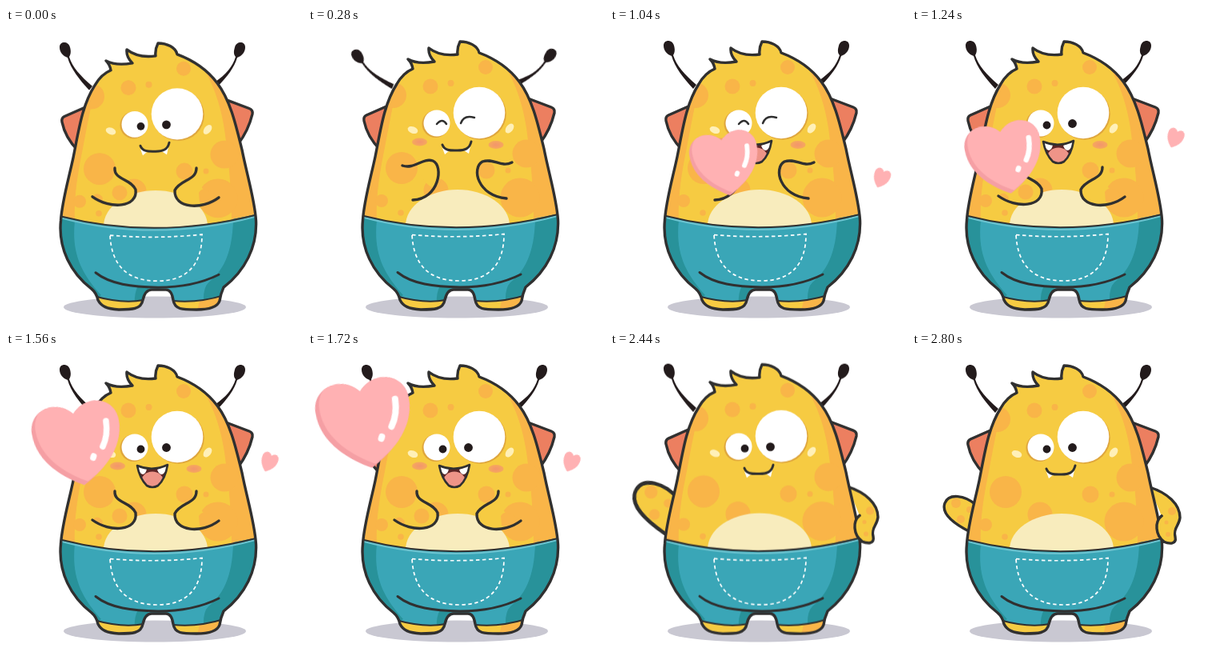
An HTML page that plays this animation: 370x370 px, repeating every 3160 ms.

```html
<!DOCTYPE html>
<html lang="en">
<head>
<meta charset="utf-8">
<title>Little monster blows a kiss</title>
<style>
html, body { margin: 0; width: 100%; height: 100%; overflow: hidden; background: #fff; }
svg { display: block; width: 100vw; height: 100vh; }
.line { fill: none; stroke: #303030; stroke-width: 3.4; stroke-linecap: round; stroke-linejoin: round; }
.skin { fill: #f6cb42; }
.spot { fill: #f9b548; }
.teal { fill: #3aa6b7; }
.deep { fill: #28929a; }
.cream { fill: #f8ecbd; }
.glint { fill: #fff0b8; }

/* One loop is 3160 ms; poses change hard, the heart moves in 40 ms steps. */
.a { animation: 3160ms step-end infinite; }
.kiss { animation-name: kiss; }
.open { animation-name: open; }
.fold { animation-name: fold; }
.wave { animation-name: wave; }
.grin { animation-name: grin; }
.calm { animation-name: calm; }
.flush { animation-name: flush; }
#figure { animation-name: breathe; transform-origin: 187px 355px; }
#armL { animation-name: swing; transform-origin: 80px 214px; }
#antL { animation-name: spreadL; transform-origin: 105px 73px; }
#antR { animation-name: spreadR; transform-origin: 264px 68px; }
#tiny { animation-name: hop, grin; }
#fly { animation: fly 3160ms linear infinite, grin 3160ms step-end infinite; }

@keyframes kiss  { 0%, 39.241% { visibility: hidden } 8.861% { visibility: visible } }
@keyframes open  { 0%, 39.241% { visibility: visible } 8.861% { visibility: hidden } }
@keyframes fold  { 0%, 39.241% { visibility: visible } 8.861%, 56.962% { visibility: hidden } }
@keyframes wave  { 0% { visibility: hidden } 56.962%, 100% { visibility: visible } }
@keyframes grin  { 0%, 56.962%, 100% { visibility: hidden } 22.785% { visibility: visible } }
@keyframes calm  { 0%, 56.962%, 100% { visibility: visible } 22.785% { visibility: hidden } }
@keyframes flush { 0%, 56.962%, 100% { visibility: hidden } 8.861% { visibility: visible } }
@keyframes breathe {
  0% { transform: scaleY(.994) }
  8.861%, 65.823%, 88.608%, 100% { transform: none }
  56.962%, 77.215% { transform: scaleY(1.004) }
}
@keyframes swing {
  0%, 65.823%, 88.608%, 100% { transform: none }
  56.962%, 77.215% { transform: rotate(8deg) scale(1.35) }
}
@keyframes spreadL { 0%, 22.785%, 100% { transform: none } 8.861% { transform: rotate(-16deg) } }
@keyframes spreadR { 0%, 22.785%, 100% { transform: none } 8.861% { transform: rotate(16deg) } }
@keyframes hop {
  0% { transform: translate(339px, 188px) rotate(22deg) scale(.19, .235) }
  39.241%, 100% { transform: translate(328.5px, 138px) rotate(22deg) scale(.19, .235) }
}
@keyframes fly {
  0%, 22.785% { transform: translate(191px, 163px) rotate(-9deg) scale(.615); animation-timing-function: steps(8) }
  32.911% { transform: translate(144px, 169.5px) rotate(-9deg) scale(.775); animation-timing-function: steps(5) }
  39.241% { transform: translate(116px, 162.5px) rotate(-10deg) scale(.865); animation-timing-function: steps(8) }
  49.367% { transform: translate(90px, 115px) rotate(-9deg) scale(1); animation-timing-function: steps(6) }
  56.962%, 100% { transform: translate(62px, 77px) rotate(-9deg) scale(1.11) }
}
</style>
</head>
<body>
<svg viewBox="0 0 370 370">
  <defs>
    <path id="body" d="M68.500 240C70 216 78 189 84 161C91 126 95 95 111 70Q119 56 131 51Q130 44 125 39C134 44 147 44 158 42Q150 34 151 25Q165 36 187 33Q186 25 190 17C201 17 212 22 214 31Q246 43 264 67C280 88 287 118 295 151C301 182 311 214 312.500 240C314 273 299 303 272 324Q268 333 267 341C264 350 252 352 238 352C220 352 211 352 209 340Q207 327 200 327H182Q174 327 171 340C169 352 157 352 141 352C126 351 119 348 115 340Q113 331 107 326C81 306 65 275 68.500 240Z"/>
    <path id="heart" d="M0 52C-22 40-55 16-55-21C-55-52-18-60 0-38C18-60 55-52 55-21C55 16 22 40 0 52Z"/>
    <clipPath id="inBody"><use href="#body"/></clipPath>
    <clipPath id="inHeart"><use href="#heart"/></clipPath>
    <path id="foldL" d="M136 174C135 189 156 187 162 201C165 224 130 226 108 210"/>
    <path id="foldR" d="M238 174C238 190 218 188 211 202C210 225 245 227 266 211"/>
    <path id="raiseL" d="M118 172C133 177 143 162 156 166C170 172 164 214 131 215"/>
    <path id="outL" d="M80 191C66 179 46 176 41 189C36 203 53 215 73 225"/>
    <path id="outR" d="M297 169C319 176 335 190 335 207C334 217 326 221 329 231C331 241 322 240 314 237C305 229 301 212 312 205"/>
    <path id="smile" d="M164 142Q183 150 202 141Q199 159 190 167Q183 171 176 167Q167 158 164 142Z"/>
    <clipPath id="inSmile"><use href="#smile"/></clipPath>
    <radialGradient id="rouge">
      <stop offset=".2" stop-color="#f3986a"/>
      <stop offset="1" stop-color="#f6a95c"/>
    </radialGradient>
  </defs>

  <ellipse cx="186" cy="349" rx="114" ry="13.5" fill="#c9c8d2"/>

  <g id="figure" class="a">
    <g id="antL" class="a" fill="#231b1c">
      <path d="M67 22C67 14 78 14 80 22C82 29 80 32 79 34C83 47 93 58 108 71L104 76C92 63 81 49 77 35C71 33 67 28 67 22Z"/>
    </g>
    <g id="antR" class="a" fill="#231b1c">
      <path d="M299 22C299 14 288 14 286 22C284 29 285 32 287 34C283 47 275 56 261 66L265 71C277 58 285 48 289 35C295 33 299 28 299 22Z"/>
    </g>
    <g class="line" style="fill:#ec7f60">
      <path d="M98 98L73 109Q69 111 70 116Q74 136 90 152Z"/>
      <path d="M275 88L304 99Q309 101 308 106Q303 127 290 144Z"/>
    </g>

    <g class="a wave">
      <g id="armL" class="a">
        <use href="#outL" class="skin"/>
        <g class="spot"><circle cx="55" cy="189" r="6"/><circle cx="61" cy="209" r="5"/><circle cx="72" cy="197" r="4"/></g>
        <use href="#outL" class="line"/>
      </g>
      <use href="#outR" class="skin"/>
      <use href="#outR" class="line"/>
    </g>

    <use href="#body" class="skin"/>
    <g clip-path="url(#inBody)">
      <g class="spot">
        <path d="M245 45C266 80 273 115 276 150C280 180 282 215 282 244H325V45Z"/>
        <path d="M60 245V80H110C102 115 98 140 92 170C87 198 85 220 86 245Z"/>
        <circle cx="107" cy="84" r="16"/><circle cx="153" cy="73" r="9.5"/>
        <circle cx="178.500" cy="69" r="4"/><circle cx="222" cy="49" r="9"/>
        <circle cx="117" cy="175" r="20"/><circle cx="160" cy="203" r="15.500"/>
        <circle cx="92" cy="216" r="8"/><circle cx="116" cy="231" r="3.800"/>
        <circle cx="223" cy="178" r="10.500"/><circle cx="250" cy="178" r="3.500"/>
        <circle cx="273" cy="157" r="17.500"/><circle cx="265" cy="212" r="24.500"/>
      </g>
      <ellipse cx="187" cy="247" rx="65" ry="45" class="cream"/>

      <path class="teal" d="M60 232Q187 267 320 230V360H60Z"/>
      <path class="deep" d="M60 232L86 240C82 279 92 304 119 334L110 340H60Z"/>
      <path class="deep" d="M284 238C283 284 270 304 253 318Q246 325 247 343H325V230Z"/>
      <path class="deep" d="M165 322Q160 332 161 343H178V322Z"/>
      <path d="M68 236.500Q187 268.500 314 234.500" fill="none" stroke="#6cc3d0" stroke-width="2"/>
      <path d="M66 234Q187 265.500 316 232" class="line" style="stroke-width:2"/>
      <path class="skin" d="M108 335Q145 345 175 340V358H108ZM205 341Q240 344 275 334V358H205Z"/>
      <path class="spot" d="M242 341Q260 340 275 334V358H238Z"/>
      <path class="line" style="stroke-width:2" d="M110 335Q145 345 172 340M209 341Q240 344 272 334"/>
    </g>
    <use href="#body" class="line"/>
    <path class="line" style="stroke-width:3" d="M112 305.500C130 320 158 323.500 190 324C222 324 246 318 266 308"/>
    <path d="M130 258.500Q188 263.500 245 257.500C245 296 226 316 189 316C151 316 132 296 130 258.500Z" fill="none" stroke="#fff" stroke-width="1.700" stroke-dasharray="4.500 3.500"/>

    <g class="a wave">
      <path class="skin" d="M312 206C303 212 304 229 315 236L326 235L329 208Z"/>
      <g class="spot"><circle cx="318" cy="213" r="2.500"/><circle cx="325" cy="199" r="5"/><circle cx="320" cy="228" r="3"/></g>
      <path class="line" d="M312 205C303 212 304 229 315 237"/>
    </g>

    <g>
      <circle cx="159.500" cy="120" r="17" fill="#dfa63d"/>
      <circle cx="161" cy="119" r="16.500" fill="#fff"/>
      <circle cx="215.500" cy="107.500" r="32.300" fill="#dfa63d"/>
      <circle cx="214" cy="106" r="32.300" fill="#fff"/>
      <ellipse class="glint" cx="131" cy="127.500" rx="6.500" ry="4.300" transform="rotate(20 131 127.500)"/>
      <ellipse class="glint" cx="252" cy="125.500" rx="6.800" ry="4.300" transform="rotate(-52 252 125.500)"/>
    </g>
    <g class="a open" fill="#231b1c"><circle cx="168.500" cy="121.500" r="4.900"/><circle cx="200.500" cy="119.500" r="5.400"/></g>
    <path class="line a kiss" style="stroke-width:2.500" d="M161 120Q168 112 173 120M191 119Q195 108 208 112"/>
    <g class="a flush" fill="url(#rouge)">
      <ellipse cx="139.500" cy="142.500" rx="9.500" ry="5"/><ellipse cx="235" cy="146" rx="9.500" ry="5"/>
    </g>

    <g class="a calm">
      <path d="M168 150L171 158L177 153ZM195 153L201 157L203 148Z" fill="#fff"/>
      <path class="line" style="stroke-width:3" d="M168 146C171 154 179 153 187 153C196 153 202 151 204 142"/>
    </g>
    <g class="a grin">
      <use href="#smile" fill="#5b2526"/>
      <g clip-path="url(#inSmile)">
        <ellipse cx="183" cy="162" rx="14" ry="12.500" fill="#ee9488"/>
        <path d="M164 142Q167 153 171 153Q175 152 176 146ZM189 147Q191 153 195 153Q200 151 202 141Z" fill="#fff"/>
      </g>
      <use href="#smile" class="line" style="stroke-width:2.600"/>
    </g>

    <g class="a fold">
      <path class="skin" d="M136 174C135 189 156 187 162 201C165 224 130 226 108 210Q134 200 136 174Z"/>
      <path class="skin" d="M238 174C238 190 218 188 211 202C210 225 245 227 266 211Q240 208 238 174Z"/>
      <g class="spot"><circle cx="142" cy="205" r="9.500"/><path d="M108 210Q114 203 120 210Q122 214 119 216Z"/><path d="M241 205Q247 194 266 211Q252 220 242 217Z"/></g>
      <use href="#foldL" class="line"/><use href="#foldR" class="line"/>
    </g>
    <g class="a kiss">
      <path class="skin" d="M137 172Q147 165 156 166C166 170 165 186 157 200Q142 194 137 172Z"/>
      <use href="#raiseL" class="line"/>
      <path class="line" d="M255 168C241 175 232 162 218 167C204 175 212 210 248 213"/>
    </g>
  </g>

  <use id="tiny" class="a" href="#heart" fill="#ffb1b3"/>
  <g id="fly">
    <use href="#heart" fill="#f59fa4"/>
    <g clip-path="url(#inHeart)"><use href="#heart" fill="#ffb1b3" transform="translate(5 -4)"/></g>
    <path d="M39-23Q39-5 30 8M17 18L16 20" fill="none" stroke="#fff" stroke-width="7.500" stroke-linecap="round"/>
  </g>
</svg>
</body>
</html>
```
